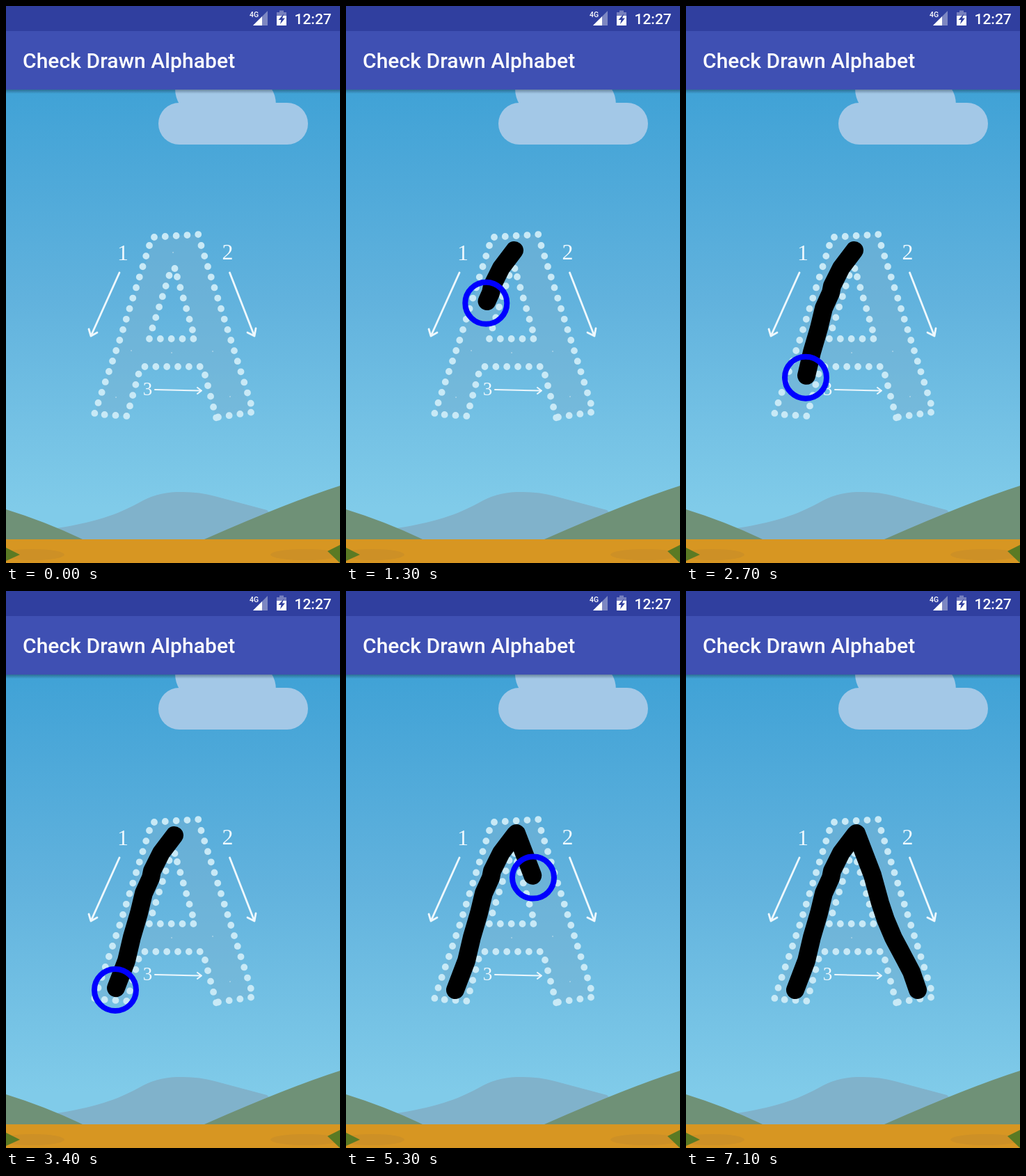
These frames come from a looping animation (480 px wide and 800 px high, 8 s). An HTML page:

```html
<!DOCTYPE html>
<html lang="en">
<head>
<meta charset="utf-8">
<title>Check Drawn Alphabet</title>
<style>
  html, body { margin: 0; width: 100%; height: 100%; overflow: hidden; background: #3f51b5; }
  svg { display: block; width: 480px; height: 800px; }
  .ui { font-family: Roboto, sans-serif; font-weight: 500; fill: #fff; }
  .digit { font-family: "Liberation Serif", serif; fill: #eef8fd; text-anchor: middle; }
  .round { fill: none; stroke-linecap: round; stroke-linejoin: round; }
  .arrow { stroke: #eef8fd; stroke-width: 2.8; }
  .dots { stroke: #c8e9f6; stroke-width: 9.8; stroke-dasharray: 0 15.84; }
  .specks { stroke: #d5e6ee; stroke-width: 1.4; }
  .ink { stroke: #000; stroke-width: 26; }
</style>
</head>
<body>
<svg viewBox="0 0 480 800">
  <defs>
    <linearGradient id="sky" x1="0" y1="0" x2="0" y2="1">
      <stop offset="0" stop-color="#40a2d6"/>
      <stop offset=".5" stop-color="#61b2dd"/>
      <stop offset="1" stop-color="#80cbe9"/>
    </linearGradient>
    <linearGradient id="shade" x1="0" y1="0" x2="0" y2="1">
      <stop offset="0" stop-color="#123" stop-opacity=".4"/>
      <stop offset="1" stop-color="#123" stop-opacity="0"/>
    </linearGradient>
  </defs>

  <rect y="120" width="480" height="600" fill="url(#sky)"/>
  <rect y="719" width="480" height="50" fill="#80cbe9"/>
  <g fill="#a3c8e7">
    <path d="M243 118Q243 132 250 142H388Q388 128 381 118Z"/>
    <rect x="219" y="139" width="215" height="60" rx="30"/>
  </g>

  <path fill="#80b2cb" d="M60 752C130 742 160 730 190 714Q215 699 245 698Q275 697 300 704L375 724L420 770H60Z"/>
  <g fill="#6f9177">
    <path d="M0 723Q58 741 110 766H0Z"/>
    <path d="M480 689Q405 713 285 766H480Z"/>
  </g>
  <rect y="766" width="480" height="34" fill="#d79622"/>
  <g fill="#cd9026">
    <ellipse cx="38" cy="788" rx="46" ry="8"/>
    <ellipse cx="430" cy="788" rx="50" ry="8"/>
  </g>
  <g fill="#5a7a24">
    <path d="M0 778L20 788L0 797Z"/>
    <path d="M480 774L462 783L480 800Z"/>
  </g>

  <path fill="#78b2d1" fill-opacity=".45" fill-rule="evenodd"
    d="M213 332L276 328L352 583L302 591L280 518H197L174 589L127 586ZM242 377L206 478H269Z"/>
  <path class="round dots" d="M206 344L163 481L127 586L174 589L191 527
    M213 332L277 328M280.500 344L352.500 573M305 590.500L353 583.500
    M199.500 518H280M286 530L302.300 592
    M242.500 377h.1M234.500 387L210 464M246 389L268.500 467M206 478H270"/>
  <path class="round specks" d="M240 354h.1M180 495h.1M238 498h.1M297 496h.1M158 562h.1M322 561h.1"/>

  <g class="digit" font-size="32">
    <text x="168" y="365">1</text>
    <text x="318.500" y="364">2</text>
    <text x="203.500" y="559" font-size="27">3</text>
  </g>
  <g class="round arrow">
    <path d="M163 383L122 474M119 464L122 474L131 469"/>
    <path d="M321.500 383L357 474M347 469L357 474L359 463"/>
    <path d="M214 551L280 552.500M275 548L281 552.500L275 557" style="stroke-width: 2"/>
  </g>

  <path class="round ink" d="M242 351L223 376L210 402L208 412L198 434L191 463L181 497L173 531L157 573"/>
  <path class="round ink" d="M245 348L268 408L279 448L287 472L298 498L314 528L324 547L333 573"/>
  <circle id="ring" r="30" fill="none" stroke="#00f" stroke-width="8"/>

  <rect y="120" width="480" height="6" fill="url(#shade)"/>
  <rect width="480" height="120" fill="#3f50b3"/>
  <rect width="480" height="36" fill="#303f9f"/>
  <text class="ui" x="24" y="89" font-size="30" letter-spacing=".06">Check Drawn Alphabet</text>
  <text class="ui" x="414.500" y="26" font-size="21">12:27</text>
  <text class="ui" x="350" y="16" font-size="10.500">4G</text>
  <path fill="#7d87c2" d="M376 7V28H355Z"/>
  <path fill="#fff" d="M368 15V28H355Z"/>
  <path fill="#7780be" d="M389 9H393V6.500H399V9H403V15H389Z"/>
  <path fill="#fff" d="M389 14H403V28H389Z"/>
  <path fill="#303f9f" d="M399.500 11L391.500 20H395.500L394 26L401 17.500H397Z"/>
</svg>
<script>
const LOOP = 8000;
const STEP = 233;  // time between touch samples
const PHASE = 99;  // the first sample lasts this much less
const LAG = 3;     // the ink trails the touch point slightly

// Length drawn after k samples: offset + speed * k + gain * k^2
const [first, second] = document.querySelectorAll(".ink");
const strokes = [
  { path: first, down: 200, lift: 3600, offset: 15, speed: 12.5, gain: 0.375 },
  { path: second, down: 4700, lift: 7100, offset: 9, speed: 16.4, gain: 1.09 }
];
const ring = document.getElementById("ring");

function show(element, visible) {
  element.setAttribute("visibility", visible ? "visible" : "hidden");
}

function draw(time) {
  show(ring, false);
  for (const { path, down, lift, offset, speed, gain } of strokes) {
    show(path, time >= down);
    if (time < down) continue;

    const touching = time < lift;
    const total = path.getTotalLength();
    const k = Math.floor((time - down + PHASE) / STEP);
    const length = Math.min(total, offset + speed * k + gain * k * k);
    path.setAttribute("stroke-dasharray", touching ? `${length - LAG} ${total}` : "none");

    if (touching) {
      const { x, y } = path.getPointAtLength(length);
      ring.setAttribute("transform", `translate(${x} ${y})`);
      show(ring, true);
    }
  }
}

const begin = performance.now();
function tick() {
  draw((performance.now() - begin) % LOOP);
  requestAnimationFrame(tick);
}
tick();
</script>
</body>
</html>
```
